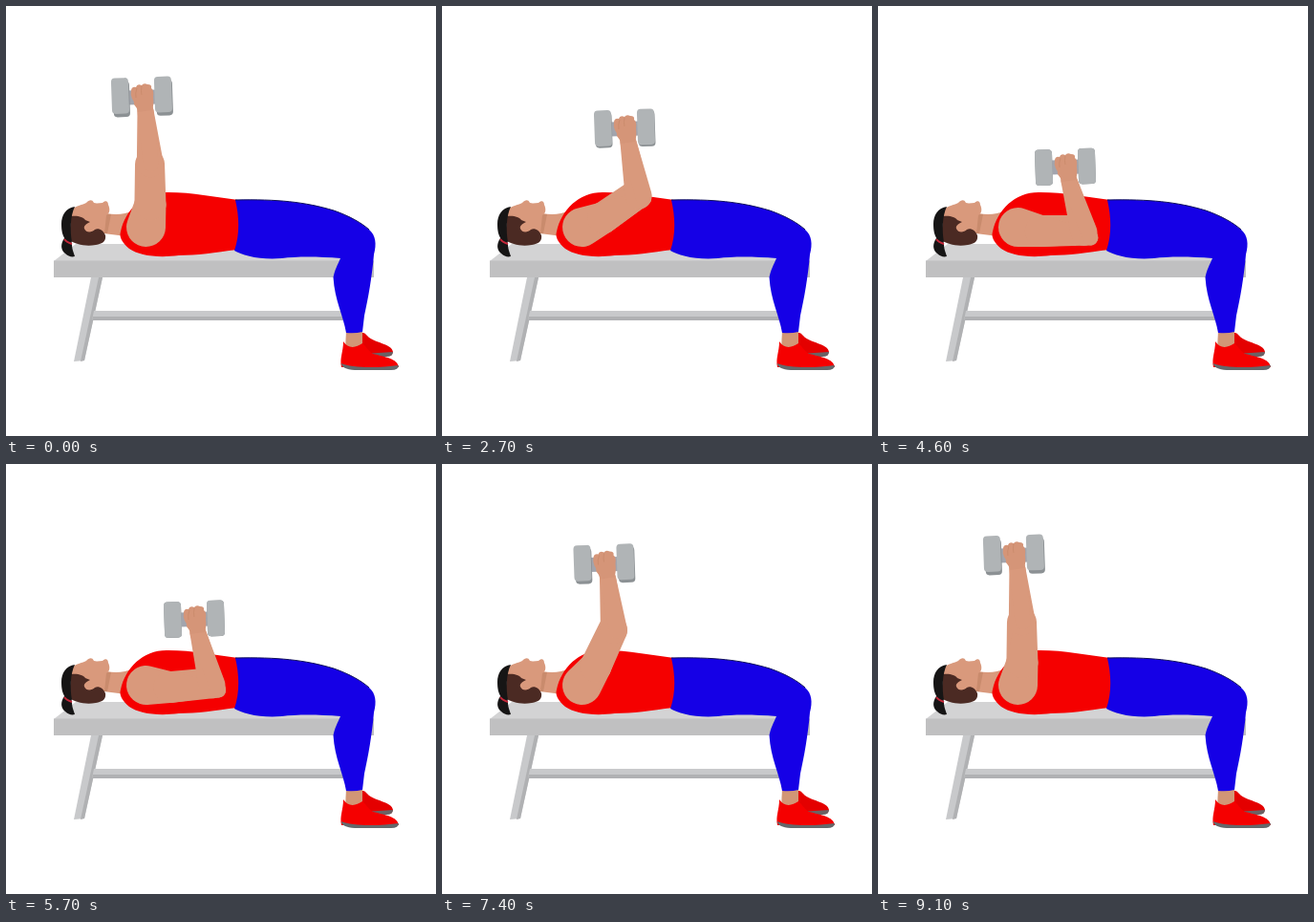
An HTML page with a canvas that plays this animation: 450 px wide and 450 px high, repeating every 9200 ms.

```html
<!DOCTYPE html>
<html lang="en">
<head>
<meta charset="utf-8">
<title>Dumbbell press</title>
<style>
html, body { margin: 0; width: 100%; height: 100%; overflow: hidden; background: #fff; }
canvas { display: block; width: 450px; height: 450px; }
</style>
</head>
<body>
<canvas id="stage" width="450" height="450"></canvas>
<script>
const ctx = document.getElementById('stage').getContext('2d');
const LOOP = 9200, STEP = 100;
const SKIN = '#d9997c', SHADE = '#c98b6d', RED = '#f50000', BLUE = '#1500e6';
const METAL = '#c8c9cb', METAL_DARK = '#b0b1b3';
const SHOULDER = { x: 146.5, y: 231.5 }, UPPER = 66;

// time, upper arm angle above horizontal, hand x, hand y
const KEYS = [
  [0, 86.5, 142, 95],
  [400, 86, 142.8, 95],
  [1000, 81, 149, 95.2],
  [1600, 67.5, 164, 101],
  [2000, 56, 174, 108],
  [2700, 31, 191, 128],
  [3000, 22, 194.5, 138],
  [4000, 3, 196.8, 161],
  [4600, -2.5, 196, 168],
  [5000, -2.8, 196, 168.5],
  [5700, 2.2, 197, 162],
  [6000, 11, 196.5, 152.5],
  [6630, 32, 190.5, 128],
  [7000, 48, 180, 114],
  [7400, 61, 169.5, 104.5],
  [8000, 79, 152, 95.8],
  [8700, 86, 142.8, 95],
  [9200, 86.5, 142, 95]
];

function slope(i, c) {
  if (i === 0 || i === KEYS.length - 1) return 0;
  const a = KEYS[i - 1], b = KEYS[i + 1];
  return (b[c] - a[c]) / (b[0] - a[0]);
}

function sample(t, c) {
  let i = 0;
  while (i < KEYS.length - 2 && t >= KEYS[i + 1][0]) i++;
  const a = KEYS[i], b = KEYS[i + 1], h = b[0] - a[0];
  const s = (t - a[0]) / h, s2 = s * s, s3 = s2 * s;
  return a[c] * (2 * s3 - 3 * s2 + 1) + b[c] * (3 * s2 - 2 * s3) +
    h * (slope(i, c) * (s3 - 2 * s2 + s) + slope(i + 1, c) * (s3 - s2));
}

function shape(d, fill, line, width = 1) {
  const p = new Path2D(d);
  if (fill) { ctx.fillStyle = fill; ctx.fill(p); }
  if (line) { ctx.strokeStyle = line; ctx.lineWidth = width; ctx.stroke(p); }
}

// Tapered limb: the hull of two circles
function limb(a, ra, b, rb, fill) {
  const dx = b.x - a.x, dy = b.y - a.y, d = Math.hypot(dx, dy);
  ctx.beginPath();
  if (d <= Math.abs(ra - rb)) {
    const [c, r] = ra > rb ? [a, ra] : [b, rb];
    ctx.arc(c.x, c.y, r, 0, 2 * Math.PI);
  } else {
    const q = Math.atan2(dy, dx), f = Math.acos((ra - rb) / d);
    ctx.arc(a.x, a.y, ra, q + f, q - f + 2 * Math.PI);
    ctx.arc(b.x, b.y, rb, q - f, q + f);
    ctx.closePath();
  }
  ctx.fillStyle = fill;
  ctx.fill();
}

function bench() {
  shape('M50 267L73 249H352L385 267Z', '#d3d3d4');
  shape('M89 284H101L82 371L71 372Z', METAL);
  shape('M97 284H101L82 371L78 372Z', METAL_DARK);
  shape('M92 319H356V329H90Z', METAL);
  shape('M91 325H356V329H90Z', METAL_DARK);
  shape('M50 266.5H385V284H50Z', '#c0c0c1');
}

function head() {
  shape('M105 217C116 219 124 218 134 214L126 241L102 238Z', SKIN);
  shape('M104 218L110 218L106 238L102 238Z', SHADE);
  shape('M68 213C74 209 80 208 84 206C87 203 90 202 92 206C95 207 98 206 101 206' +
    'C104 203 107 204 107 208C109 212 109 217 105 219L103 238L84 240L68 226Z', SKIN);
  shape('M68 220C75 219 81 221 83 224L88 226C84 228 81 230 82 233C84 238 90 237 93 234' +
    'C97 232 102 235 104 240C105 246 101 249 94 250C82 252 73 249 66 245Z', '#4b2a23');
  shape('M72 210C63 211 58 219 58 228C58 235 59 240 62 244L69 247C67 236 67 220 72 210Z', '#161515');
  shape('M61 243C57 249 57 255 62 259C65 262 69 263 72 262C71 258 69 255 69 249L68 245Z', '#161515');
  shape('M61 244C63 247 66 248 69 249', null, '#c5283a', 2);
}

function body() {
  shape('M170 195C195 195 219 200 243 203L246 232L242 255C218 258 200 261 181 261' +
    'C158 264 139 261 129 254C122 248 118 242 120 236C125 213 144 194 170 195Z', RED);
  shape('M240 203C284 202 313 205 343 214C360 220 372 227 380 234C387 240 388 249 385 260' +
    'C383 284 379 306 375 324L373 341Q365 343 356 342C353 324 344 308 342.5 284' +
    'C344 276 347 271 350 264C326 262 304 262 289 264C266 266 247 261 239 256' +
    'C245 239 244 220 240 203Z', BLUE);
  shape('M240 203C284 202 313 205 343 214C360 220 372 227 380 234', null, '#10105a', 1);
}

function shoes() {
  shape('M371 342Q375 341 378 345C385 353 404 353 405 362L403 366L374 366Z', '#e40000');
  shape('M375 364L405 362Q405 367 398 367L376 367Z', '#6a6265');
  shape('M356 340H373V359H355Z', '#d29676');
  shape('M353 351C358 359 366 358 373 353C376 355 379 361 384 364C396 367 410 369 411 378' +
    'L351 378C349 368 353 362 353 351Z', RED);
  shape('M351 374C362 379 390 379 411 376Q411 381 403 381H365Q351 380 351 374Z', '#65676a');
}

function plate(x, y, w, h, depth) {
  const box = (color, dx, dy) => {
    ctx.fillStyle = color;
    ctx.beginPath();
    ctx.roundRect(x + dx, y + dy, w - dx / 2, h, 4);
    ctx.fill();
  };
  box('#8c9194', depth / 2, depth);
  box('#b0b4b6', 0, 0);
}

// The underside of the weights shows as they rise above eye level
function dumbbell(hand, rise) {
  const top = -18.5 - 2 * rise, depth = 3.5 * Math.max(0, rise);
  ctx.save();
  ctx.translate(hand.x, hand.y);
  ctx.rotate(-0.035);
  shape('M-15 -7H16V8H-15Z', '#a2a4ad');
  plate(-31.5, top, 18, 37.5, depth);
  plate(13.5, top, 18, 37.5, depth);
  ctx.restore();
}

function fist(hand) {
  ctx.save();
  ctx.translate(hand.x, hand.y);
  shape('M-11 -7Q-10 -11 -6 -10Q-5 -14 0 -12Q2 -15 6 -13Q11 -13 10 -9Q13 -7 12 0' +
    'Q13 8 11 14L-4 16Q-5 11 -8 8Q-8 4 -10 2Q-12 -2 -11 -7Z', '#d59578');
  shape('M-5 -9Q-7 -4 -6 1M0 -11Q-1 -6 0 -2', null, '#c68768', 0.7);
  ctx.restore();
}

function arm(t) {
  const a = sample(t, 1) * Math.PI / 180;
  const hand = { x: sample(t, 2), y: sample(t, 3) };
  const ux = Math.cos(a), uy = -Math.sin(a);
  const along = (k, side) => ({ x: SHOULDER.x + ux * k - uy * side, y: SHOULDER.y + uy * k + ux * side });
  const mid = along(24, 3), elbow = along(UPPER, 0);
  const wrist = { x: hand.x + 4, y: hand.y + 15 };
  const fx = wrist.x - elbow.x, fy = wrist.y - elbow.y, d = Math.hypot(fx, fy);
  const bx = ux - fx / d, by = uy - fy / d;
  const out = k => ({ x: elbow.x + bx * k, y: elbow.y + by * k });

  dumbbell(hand, Math.sin(a));
  limb(SHOULDER, 20.5, mid, 16.5, SKIN);
  limb(mid, 16.5, elbow, 15.5, SKIN);
  limb(mid, 16.5, out(8), 8, SKIN);
  limb(out(2.5), 14, wrist, 8.5, SKIN);
  limb(out(8), 8, wrist, 8.5, SKIN);
  fist(hand);
}

function frame(now) {
  const t = Math.floor((now % LOOP) / STEP) * STEP;
  ctx.fillStyle = '#fff';
  ctx.fillRect(0, 0, 450, 450);
  bench();
  head();
  shoes();
  body();
  arm(t);
  requestAnimationFrame(() => frame(performance.now() - start));
}

const start = performance.now();
frame(0);
</script>
</body>
</html>
```
